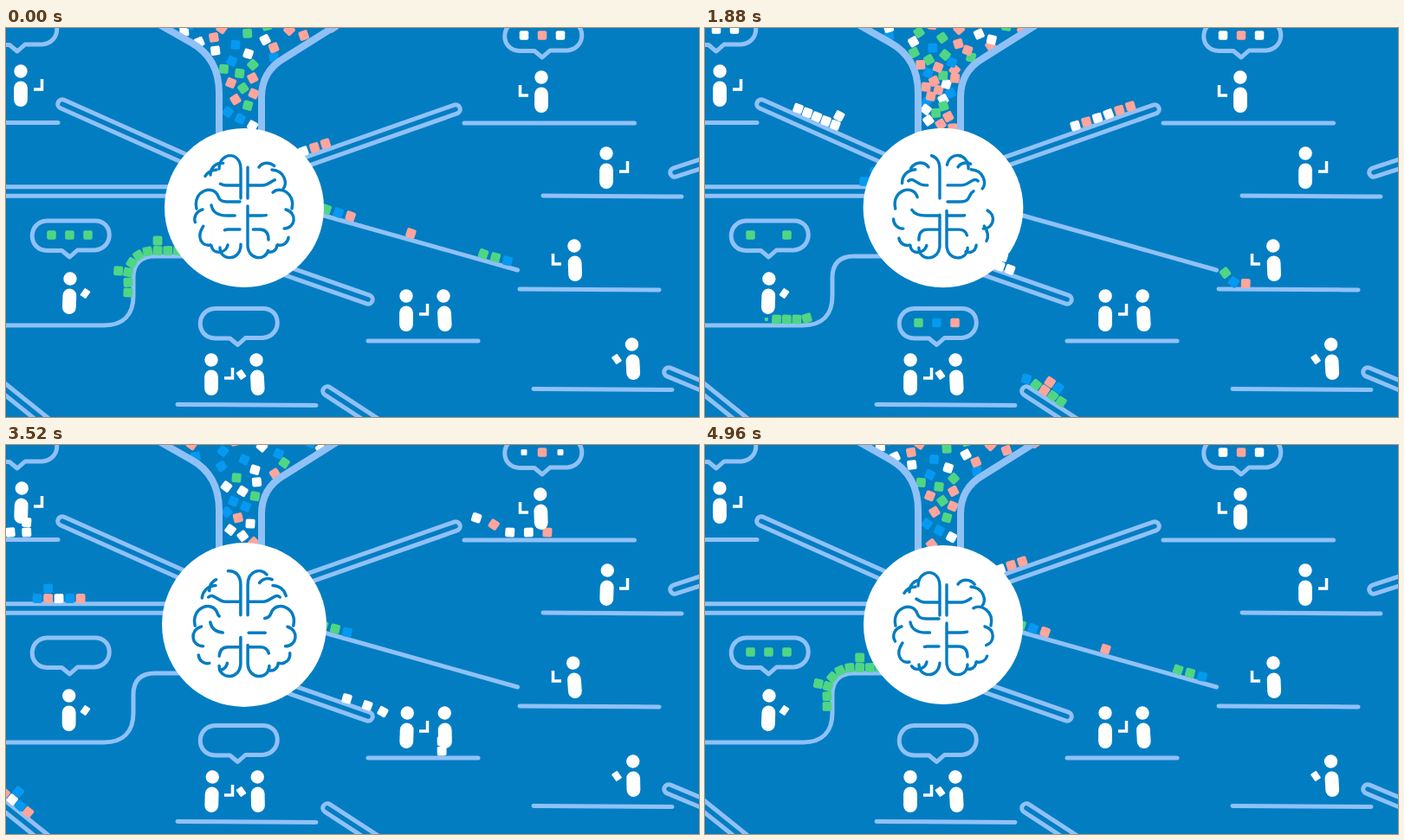
Write an HTML page that moves like this. It is 800 px wide and 450 px high and loops after 5 s.

```html
<!DOCTYPE html>
<html lang="en">
<head>
<meta charset="utf-8">
<title>Brain sorting cubes</title>
<style>
html, body { margin: 0; width: 100%; height: 100%; overflow: hidden; background: #037dc2; }
svg { display: block; width: 800px; height: 450px; }
.line { fill: none; stroke: #90c1f6; stroke-width: 5; stroke-linecap: round; stroke-linejoin: round; }
.bore { fill: none; stroke: #037dc2; stroke-width: 5.5; stroke-linecap: round; }
.hand { fill: none; stroke: #fff; stroke-width: 3.5; }
.fold { fill: none; stroke: #037dc2; stroke-width: 3.4; stroke-linecap: round; stroke-linejoin: round; }
</style>
</head>
<body>
<svg id="stage" viewBox="0 0 800 450"></svg>
<script>
const LOOP = 5;
const COLORS = { w: '#fff', g: '#50d585', c: '#ffa59c', b: '#0699f0' };
const stage = document.getElementById('stage');
const updates = [];

const mod = (a, n) => ((a % n) + n) % n;
const clamp = v => Math.max(0, Math.min(1, v));
const beat = t => 0.5 - 0.5 * Math.cos(2 * Math.PI * t);

let seed = 7;
const random = () => (seed = (seed * 16807) % 2147483647) / 2147483647;
const pick = list => list[Math.floor(random() * list.length)];

function add(tag, attrs, parent = stage) {
  const el = document.createElementNS('http://www.w3.org/2000/svg', tag);
  for (const k in attrs) el.setAttribute(k, attrs[k]);
  parent.appendChild(el);
  return el;
}
const line = (d, width = 5) => add('path', { d, class: 'line', style: `stroke-width:${width}` });

function cube(color, size = 10.8) {
  return add('rect', { x: -size / 2, y: -size / 2, width: size, height: size, rx: 2, fill: COLORS[color] });
}
function place(el, x, y, deg = 0, scale = 1) {
  el.setAttribute('transform', `translate(${x.toFixed(2)} ${y.toFixed(2)}) rotate(${deg.toFixed(1)}) scale(${scale.toFixed(3)})`);
}
const hide = el => place(el, 0, 0, 0, 0);

// Funnel: cubes spread evenly between two curved walls and speed up into the neck.
const wallLeft = y => 255 - 0.0147 * Math.max(0, 63 - y) ** 2;
const wallRight = y => 286 + 0.018 * Math.max(0, 70 - y) ** 2;
const FALL = 2.1, COUNT = 125;

for (let i = 0; i < COUNT; i++) {
  const p = i / COUNT;
  const start = LOOP * p - 0.25 * Math.sin(2 * Math.PI * p);
  const u = clamp((mod(i * 0.618, 1) - 0.5) * 1.2 + 0.5);
  const tilt = random() * 90;
  const el = cube(pick(u === 1 ? 'cw' : 'wgcb'));
  updates.push(t => {
    const a = mod(t - start, LOOP) / FALL;
    if (a > 1) return hide(el);
    const y = -15 + 135 * a ** 2.6;
    const x = wallLeft(y) * (1 - u) + wallRight(y) * u;
    place(el, x, y, u === 1 && y < 40 ? -33 : tilt + 40 * a);
  });
}
line('M177 -4L214 17Q246 35 246 75V125', 8);
line('M383 -4L321 35Q295 50 295 80V125', 8);

// Pipes, rails and platforms.
for (const d of [
  'M65 88L215 155', 'M519 94L340 157', 'M-20 189H200', 'M418 314L315 278',
  'M-12 409L50 459', 'M371 420L440 465', 'M765 398L815 419', 'M772 167L815 153'
]) {
  line(d, 15.5);
  add('path', { d, class: 'bore' });
}
for (const d of [
  'M-5 109.5H60', 'M529 110H725.5', 'M620 194L780 195', 'M593 302L754 303',
  'M418 362H545', 'M198 435.5L358 436.5', 'M609 417.5L769 418.5', 'M360 215L590.5 280',
  'M-5 344H113C136 344 147 331 147 310V289Q147 264 172 264H210'
]) line(d);

// A convoy of cubes follows a path, one slot per letter; a space is an empty slot and
// a capital sits on top of the cube before. Past the ride length cubes move faster.
function convoy(d, cubes, { start, speed, gap = 11.7, ride = 1e3, boost = 1.6 }) {
  const path = add('path', { d, fill: 'none' });
  const total = path.getTotalLength();
  const point = s => path.getPointAtLength(Math.max(0, Math.min(total, s)));
  const flip = point(5).x < point(0).x ? Math.PI : 0;
  let slot = -1;
  for (const ch of cubes) {
    const stacked = ch >= 'A' && ch <= 'Z';
    if (!stacked) slot++;
    if (ch === ' ') continue;
    const back = slot * gap, lift = stacked ? 11.5 : 0, tilt = (random() - 0.5) * 10;
    const el = cube(ch.toLowerCase());
    updates.push(t => {
      const raw = speed * mod(t - start - back / speed, LOOP);
      const s = raw + (boost - 1) * Math.max(0, raw - ride);
      if (s > total) return hide(el);
      const at = point(s), a = point(s - 5), b = point(s + 5);
      const ang = Math.atan2(b.y - a.y, b.x - a.x) + flip;
      place(el, at.x + lift * Math.sin(ang), at.y - lift * Math.cos(ang),
        ang * 180 / Math.PI + tilt, clamp((total - s) / 8));
    });
  }
}

convoy('M230 148L67 75Q50 78 36 101H-20', 'wwwwwW', { start: 0.115, speed: 76, ride: 178 });
convoy('M320 151L521 80Q560 85 575 101H645', 'ccwwcw', { start: -0.75, speed: 69, gap: 13.5, ride: 213 });
convoy('M209 177.5H-16', 'bcBwbc', { start: 1.6, speed: 90, gap: 12.5 });
convoy('M-8 398L66 457', 'cbwBcb', { start: 3.12, speed: 107 });
convoy('M424 441L374 407Q360 400 350 429.500H289', 'bgcCgBg', { start: 1.05, speed: 75, ride: 60 });
convoy('M360 207L592 273Q606 290 612 295.500H690', 'bgg     c    cbg', { start: -1.75, speed: 130, gap: 14.5 });
convoy('M204 257.500H172Q146 258 141 283V305Q138 337 105 337H68', 'gggGggggGggggg', { start: -1.1, speed: 90 });
convoy('M330 272L425 304Q450 312 452 340Q460 354 475 354H525', 'wwW  ww w',
  { start: 1.59, speed: 80, gap: 12.5, ride: 100, boost: 2.5 });

// Speech bubbles: the middle dot comes later and leaves earlier by lag.
function bubble(x, y, colors, on, off, lag = 0) {
  add('path', {
    class: 'line', transform: `translate(${x} ${y})`,
    d: 'M-10 17.5H-27C-50 17 -50 -16 -27 -17H27C50 -18 51 15 28 17H8L-1 25Z'
  });
  [...colors].forEach((color, i) => {
    const el = cube(color, 10.5);
    const shift = i === 1 ? lag : 0;
    const span = mod(off - on - 2 * shift, LOOP);
    updates.push(t => {
      const a = mod(t - on - shift, LOOP);
      place(el, x - 1 + (i - 1) * 21, y - 0.5, 0, Math.min(clamp(a / 0.12), clamp((span - a) / 0.12)));
    });
  });
}
bubble(74.5, 240, 'ggg', 3.7, 2.1, 0.5);
bubble(268.5, 341.5, 'gbc', 0.5, 2.95);
bubble(620, 9, 'wcw', 4.4, 3.6, -0.35);
bubble(14, 2, 'www', 0.4, 3.5);

// People: head position, lean, held item and its side, direction of sway.
function person(x, y, lean, item, side, sway = 1) {
  if (item === 'corner') {
    add('path', { class: 'hand', d: 'M15 -20H24.500V-32', transform: `translate(${x} ${y + 41}) scale(${side} 1)` });
  } else if (item === 'card') {
    add('rect', {
      x: -4, y: -5, width: 8, height: 10, rx: 1, fill: '#fff',
      transform: `translate(${x + 17.5 * side} ${y + 17}) rotate(${35 * side})`
    });
  }
  const g = add('g', {});
  add('circle', { cy: -41, r: 7.7, fill: '#fff' }, g);
  add('rect', { x: -7.9, y: -29.5, width: 15.8, height: 29.5, rx: 7.9, fill: '#fff' }, g);
  updates.push(t => place(g, x - lean * 0.7, y + 41, lean + sway * beat(t) * 1.8));
}
person(17, 50, 0, 'corner', 1);
person(618, 57, 0, 'corner', -1, -1);
person(693, 145, 0, 'corner', 1);
person(656, 252, -2, 'corner', -1, -1);
person(74, 290, 2, 'card', 1, -1);
person(237, 384, 0, 'corner', 1);
person(289, 384, -3, 'card', -1);
person(462, 310, 0, 'corner', 1);
person(505, 310, -3);
person(722.5, 366, -3, 'card', -1);

// Brain: folds of one half, mirrored; each draws itself on and off.
const brain = add('g', {});
add('circle', { r: 92, fill: '#fff' }, brain);
const FOLDS = [
  'M-29 -45C-29 -65 -4 -66 -4 -45V-11',
  'M-17 -47C-23 -56 -39 -52 -39 -38',
  'M-32 -44C-47 -43 -50 -28 -45 -22',
  'M-40 -31C-34 -36 -30 -26 -21 -26H-5',
  'M-55 1C-60 -20 -35 -28 -30 -13Q-28 -7 -20 -7H-5',
  'M-38 -3C-36 8 -26 9 -20 9H-5',
  'M-4 -2V43C-4 62 -28 62 -28 46',
  'M-48 2C-62 6 -59 24 -46 24',
  'M-47 21C-56 34 -49 45 -39 43',
  'M-38 43C-37 55 -21 53 -19 43',
  'M-5 25H-18Q-28 25 -28 37'
];
[1, -1].forEach((side, s) => FOLDS.forEach((d, i) => {
  const el = add('path', { d, class: 'fold', pathLength: 1, transform: `scale(${side} 1)` }, brain);
  const cycles = 3 + (i + s) % 2, phase = i * 2.4 + s * 1.7;
  updates.push(t => {
    const w = 1.5 * Math.sin(2 * Math.PI * cycles * t / LOOP + phase);
    const from = 0.55 * clamp(w - 0.5), to = 1 - 0.5 * clamp(-w - 0.5);
    el.setAttribute('stroke-dasharray', `${(to - from).toFixed(3)} 2`);
    el.setAttribute('stroke-dashoffset', (-from).toFixed(3));
  });
}));
updates.push(t => place(brain, 275, 208, 0, 1 + beat(t) * 0.032));

function draw(now) {
  const t = (now / 1000) % LOOP;
  for (const update of updates) update(t);
  requestAnimationFrame(draw);
}
draw(performance.now());
</script>
</body>
</html>
```
